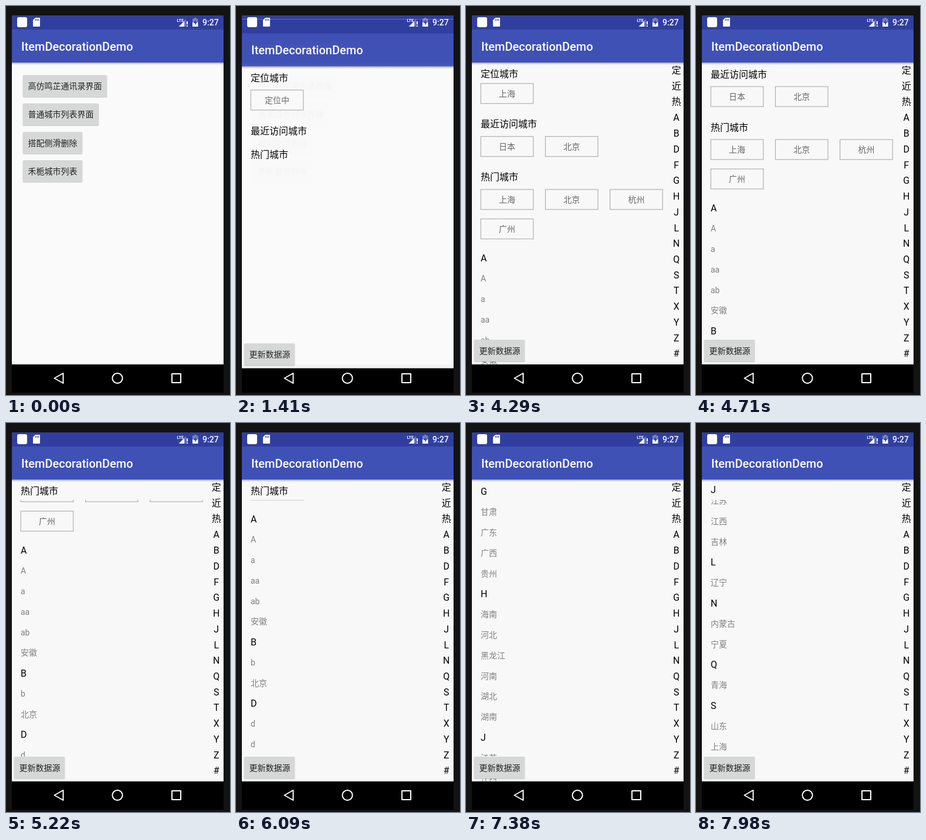
Animation of 382 by 661 pixels, one loop 8000 ms. Source, as an HTML page:

```html
<!DOCTYPE html>
<html lang="zh-CN">
<head>
<meta charset="utf-8">
<title>ItemDecorationDemo</title>
<style>
html, body { margin: 0; width: 100%; height: 100%; overflow: hidden; background: #131313; }
svg { display: block; width: 382px; height: 661px; }
text { font-family: Roboto, "Noto Sans CJK SC", "Noto Sans CJK", sans-serif; white-space: pre; }
</style>
</head>
<body>
<svg id="stage" viewBox="0 0 382 661" xmlns="http://www.w3.org/2000/svg">
  <defs>
    <clipPath id="screen"><rect x="10" y="16" width="361" height="641"/></clipPath>
    <clipPath id="content"><rect x="10" y="96" width="361" height="513"/></clipPath>
    <clipPath id="lastButton"><rect x="29" y="262" width="101" height="37" rx="2"/></clipPath>
    <linearGradient id="shade" x2="0" y2="1">
      <stop stop-color="#000" stop-opacity=".32"/>
      <stop offset="1" stop-color="#000" stop-opacity="0"/>
    </linearGradient>
  </defs>
  <rect width="382" height="661" fill="#131313"/>
  <g clip-path="url(#screen)">
    <rect x="10" y="16" width="361" height="641"/>
    <g id="home"></g>
    <g id="city"></g>
    <g id="status" fill="#fff">
      <rect x="19" y="19" width="17" height="17" rx="3"/>
      <path d="M50 20h7q1 0 1 1v13q0 1-1 1h-10q-1 0-1-1v-10z"/>
      <path d="M50.5 22v3M53 22v3M55.500 22v3" stroke="#303f9f" stroke-width="1.2"/>
      <path d="M294 35L307 22V35z" opacity=".3"/>
      <path d="M295 35L304 26V35z"/>
      <text x="291.500" y="26.500" font-size="7" font-weight="700">LTE</text>
      <path d="M308 26h2v5.500h-2zM308 33h2v2h-2z"/>
      <path d="M321 20h3.500v1.500h3v7h-9.500v-7h3z" opacity=".35"/>
      <path d="M318 28h9.500v7h-9.500z"/>
      <path d="M323.500 23l-3.500 6h2.500v4l3.500-6h-2.500z" fill="#303f9f"/>
      <text x="335" y="33" font-size="14" font-weight="500">9:27</text>
    </g>
    <g fill="none" stroke="#fff" stroke-width="2" stroke-linejoin="round">
      <path d="M82.500 632.500L97.500 624V641z"/>
      <circle cx="190" cy="632.500" r="8.600"/>
      <rect x="283" y="625" width="15" height="15"/>
    </g>
  </g>
</svg>
<script>
const $ = id => document.getElementById(id);
const LOOP = 8000, STEP = 30;
const TOP = 96, TITLE_H = 34.8, PITCH = 34.8, BODY = 415.5, GROWTH = 149.5;

function add(parent, tag, attrs = {}, text) {
  const el = document.createElementNS("http://www.w3.org/2000/svg", tag);
  for (const k in attrs) el.setAttribute(k, attrs[k]);
  if (text) el.textContent = text;
  parent.appendChild(el);
  return el;
}
const rect = (p, x, y, width, height, fill, more) => add(p, "rect", { x, y, width, height, fill, ...more });
const label = (p, x, y, size, fill, text, more) => add(p, "text", { x, y, "font-size": size, fill, ...more }, text);
const move = (el, y) => el.setAttribute("transform", `translate(0 ${y.toFixed(2)})`);
const fade = (el, a) => el.setAttribute("opacity", a.toFixed(3));
const show = (el, on) => el.setAttribute("visibility", on ? "inherit" : "hidden");
const clamp = x => Math.min(1, Math.max(0, x));
const isLatin = s => s.length === 1;

function appBar(p) {
  rect(p, 10, 96, 361, 4, "url(#shade)");
  rect(p, 10, 16, 361, 24.5, "#303f9f");
  rect(p, 10, 40, 361, 56, "#3f51b5");
  label(p, 26, 75.5, 20, "#fff", "ItemDecorationDemo", { "font-weight": 500 });
}

function button(p, x, y, w, text) {
  const shadow = rect(p, x - .5, y, w + 1, 38.2, "#000", { rx: 2.5, opacity: .16 });
  rect(p, x, y, w, 37, "#d6d7d7", { rx: 2 });
  label(p, x + 8.5, y + 23.5, 14, "#222", text);
  return shadow;
}

// Home screen
const home = $("home");
rect(home, 10, 16, 361, 593, "#fafafa");
appBar(home);
button(home, 29, 117.6, 143, "高仿鸣芷通讯录界面");
button(home, 29, 165.8, 129, "普通城市列表界面");
button(home, 29, 214, 101, "搭配侧滑删除");
const lift = button(home, 29, 262, 101, "禾栀城市列表");
const ripple = add(home, "circle", { cx: 88, cy: 284, r: 0, "clip-path": "url(#lastButton)" });

// City screen
const city = $("city");
rect(city, 10, 16, 361, 593, "#fafafa");
const pane = add(city, "g", { "clip-path": "url(#content)" });
const paper = rect(pane, 10, TOP, 361, 513, "#f8f8f8");
const list = add(pane, "g");

const sections = [];
function title(parent, name, top) {
  const el = label(parent, 25, isLatin(name) ? 23.2 : 25, 16, "#000", name);
  sections.push({ name, top, el });
}
function chip(parent, col, y, text) {
  const x = 25.2 + col * 110.2;
  rect(parent, x, y + .3, 89.6, 34, "none", { stroke: "#a2a2a2" });
  return label(parent, x + 44.8, y + 22.5, 14, "#666", text, { "text-anchor": "middle" });
}

title(list, "定位城市", 96);
title(list, "最近访问城市", 186);
title(list, "热门城市", 276);
const located = chip(list, 0, 136, "上海");
const locating = label(list, 70, 158.5, 14, "#666", "定位中", { "text-anchor": "middle" });
const recent = add(list, "g"), hot = add(list, "g");
["日本", "北京"].forEach((s, i) => chip(recent, i, 226, s));
["上海", "北京", "杭州", "广州"].forEach((s, i) => chip(hot, i % 3, 316 + 50 * (i > 2), s));

const bodyTitles = add(list, "g"), bodyItems = add(list, "g");
const groups = `A:A a aa ab 安徽|B:b 北京|D:d d|F:福建|G:甘肃 广东 广西 贵州|
H:海南 河北 黑龙江 河南 湖北 湖南|J:江苏 江西 吉林|L:辽宁|N:内蒙古 宁夏|Q:青海|S:山东 上海 山西 陕西`;
let row = 0;
for (const group of groups.split("|")) {
  const [name, items] = group.trim().split(":");
  title(bodyTitles, name, BODY + PITCH * row++);
  for (const s of items.split(" "))
    label(bodyItems, 25, BODY + PITCH * row++ + 22.4, 14, "#808080", s);
}

const sticky = add(pane, "g");
rect(sticky, 10, TOP, 361, TITLE_H, "#f8f8f8");
const stickyText = label(sticky, 25, 121, 16, "#000", " ");

const index = add(pane, "g");
[..."定近热ABDFGHJLNQSTXYZ#"].forEach((s, i) =>
  label(index, 358.7, 109 + i * 26.72 + (i < 3 ? 6 : 6.3), 16, "#000", s, { "text-anchor": "middle" }));
button(city, 14, 567, 86, "更新数据源");
appBar(city);

// Each key holds time, scroll and speed (px per ms).
const keys = [
  [4170, 0, 0], [4710, 89.4, .325], [5820, 268.4, 0],
  [6060, 268.4, 0], [6300, 333, .534], [6960, 508, 0],
  [7080, 508, 0], [7300, 683, 1.6], [8000, 1241, 0]
];
function scrollAt(t) {
  if (t <= keys[0][0]) return 0;
  const i = keys.findIndex(k => k[0] >= t);
  const [t0, y0, v0] = keys[i - 1], [t1, y1, v1] = keys[i];
  const d = t1 - t0, u = (t - t0) / d, w = 1 - u;
  return w * w * ((1 + 2 * u) * y0 + u * d * v0) + u * u * ((3 - 2 * u) * y1 - w * d * v1);
}

function drawHome(t) {
  const grow = clamp((t - 720) / 180);
  const press = t >= 750 && t < 960;
  ripple.setAttribute("r", 60 * grow);
  fade(ripple, press ? .12 * Math.min(1, (960 - t) / 90) : 0);
  fade(lift, t >= 750 && t < 1140 ? .24 : .16);
}

function drawCity(t) {
  const open = clamp((t - 1292) / 350);
  show(city, t >= 1320);
  move(city, t >= 1530 ? 0 : 51.3 * (1 - open) ** 5);
  fade(city, 1 - (1 - clamp((t - 1292) / 200)) ** 4);

  const loaded = t >= 1830, filled = t >= 2730;
  const p = (1 - Math.cos(Math.PI * clamp((t - 2730) / 270))) / 2;
  for (const el of [paper, bodyTitles, bodyItems, sticky, index]) show(el, loaded);
  fade(located, p);
  fade(locating, 1 - p);
  fade(recent, p);
  fade(hot, p);
  move(hot, -50 * (1 - p));
  move(bodyItems, -GROWTH * (1 - p));

  sections.forEach((s, i) => {
    const shift = filled || i < 2 ? 0 : i === 2 ? 50 : GROWTH;
    move(s.el, s.top - shift);
  });

  const y = scrollAt(t);
  move(list, -y);
  let now = 0;
  while (now + 1 < sections.length && sections[now + 1].top - y <= TOP) now++;
  const { name } = sections[now], next = sections[now + 1];
  const gap = next ? next.top - y - TOP - TITLE_H : 0;
  move(sticky, Math.min(0, gap));
  stickyText.textContent = name;
  stickyText.setAttribute("y", TOP + (isLatin(name) ? 23.2 : 25));
}

function draw(ms) {
  const t = Math.floor((ms % LOOP) / STEP) * STEP;
  drawHome(t);
  drawCity(t);
}

const start = performance.now();
function tick() {
  draw(performance.now() - start);
  requestAnimationFrame(tick);
}
tick();
</script>
</body>
</html>
```
